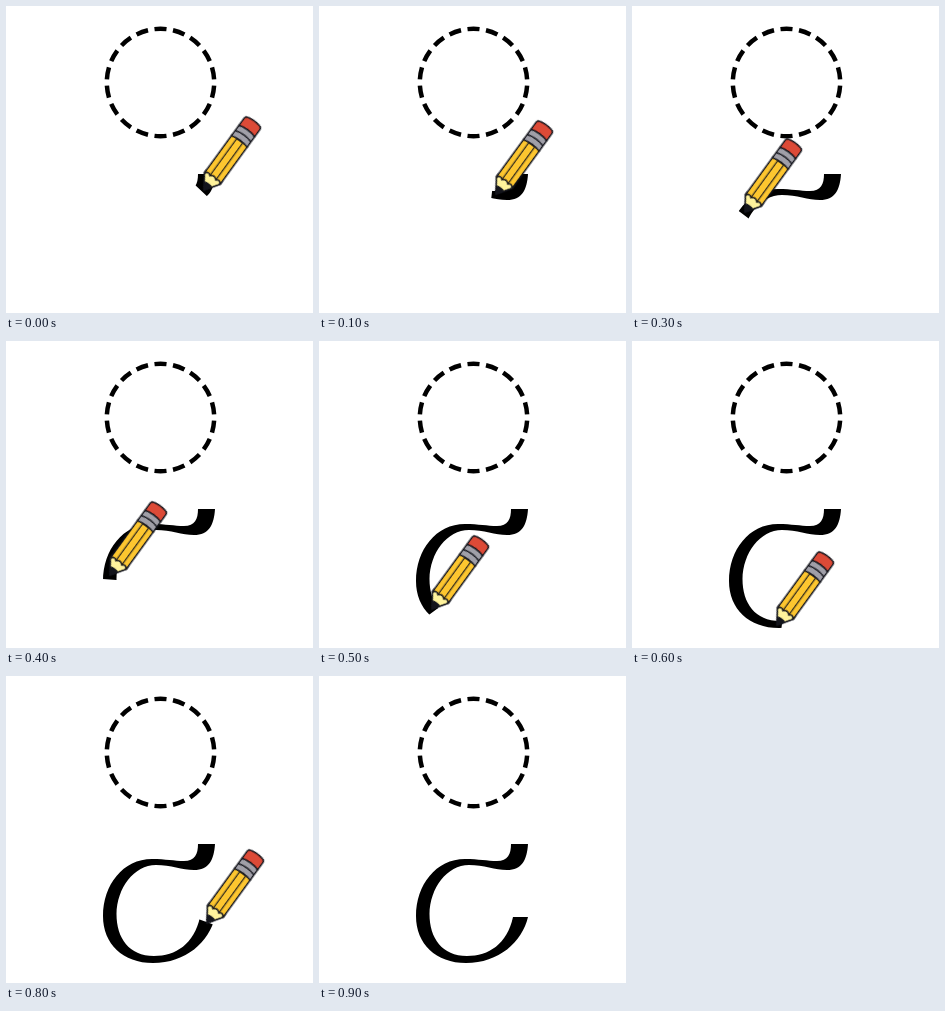
Recreate the animation shown at these times as an HTML page without scripts. Size 307 px wide and 307 px high, loop 2900 ms.

```html
<!DOCTYPE html>
<html lang="en">
<head>
<meta charset="utf-8">
<title>Pencil stroke</title>
<style>
  html, body { margin: 0; width: 100%; height: 100%; overflow: hidden; background: #fff; }
  svg { display: block; width: 100vw; height: 100vh; }

  .reveal {
    fill: none; stroke: #fff; stroke-width: 27; stroke-linejoin: miter;
    stroke-dasharray: 400;
    animation: draw 2.9s step-end infinite;
  }
  .pencil { animation: move 2.9s step-end infinite; }

  /* dash offset = 400 - drawn length */
  @keyframes draw {
    0%      { stroke-dashoffset: 379.5px; }
    3.448%  { stroke-dashoffset: 356px; }
    6.896%  { stroke-dashoffset: 320.5px; }
    10.344% { stroke-dashoffset: 286px; }
    13.793% { stroke-dashoffset: 254px; }
    17.241% { stroke-dashoffset: 219.5px; }
    20.689% { stroke-dashoffset: 181px; }
    24.137% { stroke-dashoffset: 145px; }
    27.586% { stroke-dashoffset: 114px; }
    31.034%, 100% { stroke-dashoffset: 0; }
  }
  @keyframes move {
    0%      { transform: translate(198px, 184px); }
    3.448%  { transform: translate(177px, 188px); }
    6.896%  { transform: translate(141px, 187px); }
    10.344% { transform: translate(113px, 206px); }
    13.793% { transform: translate(104px, 234px); }
    17.241% { transform: translate(113px, 268px); }
    20.689% { transform: translate(145px, 284px); }
    24.137% { transform: translate(178px, 275px); }
    27.586% { transform: translate(201px, 247px); visibility: visible; }
    31.034%, 100% { transform: translate(201px, 247px); visibility: hidden; }
  }
</style>
</head>
<body>
<svg viewBox="0 0 307 307">
  <mask id="drawn" maskUnits="userSpaceOnUse" x="0" y="0" width="307" height="307">
    <path class="reveal" d="M200.5 166V178L192 187 180 189.5 150 186 137 186.5 120 198 105 218 103.5 239 107 259 115.5 270.5 130 281 150 283.5 168 279.5 184 271 196 257 203 238"/>
  </mask>

  <circle cx="154.5" cy="76.5" r="53.7" fill="none" stroke="#000" stroke-width="4.5"
    pathLength="18" stroke-dasharray=".65 .35" stroke-dashoffset="-.175"/>

  <g mask="url(#drawn)">
    <path d="M192 168H209C208 184 203 194 188 194C176 194 165 189 150 189C128 189 111 212 110.5 238C110.5 262 123 280 148 280C170 280 188 268 194 241H209C203 266 180 287 147 287C117 287 97 268 97 240C97 209 117 183 146 183C160 183 168 185 178 185C189 185 192 178 192 168Z"/>
  </g>

  <!-- tip at the origin, pointing down before the tilt -->
  <g class="pencil">
    <g transform="rotate(36)" stroke="#14151c" stroke-width="1.5" stroke-linejoin="round">
      <path fill="#fff39c" d="M0 0L-9.7 -14V-18H9.7V-14Z"/>
      <path fill="#14151c" d="M0 0L-4.4 -6.5Q0 -8.5 4.4 -6.5Z"/>
      <path fill="#fdc62f" d="M-9.7 -14Q-6.5 -18.5 -3.7 -15Q0 -19 3.7 -15Q6.5 -18.5 9.7 -14V-61H-9.7Z"/>
      <path fill="none" stroke-width="1.1" d="M-3.7 -15V-60M3.7 -15V-60"/>
      <path fill="#a09fa8" d="M-9.7 -60Q0 -63 9.7 -60V-73Q0 -76 -9.7 -73Z"/>
      <path fill="none" d="M-9.7 -66.5Q0 -69.5 9.7 -66.5"/>
      <path fill="#dc4a37" d="M-9.7 -73Q0 -76 9.7 -73V-81.5Q9.7 -84 7.5 -84.5Q0 -86.5 -7.5 -84.5Q-9.7 -84 -9.7 -81.5Z"/>
    </g>
  </g>
</svg>
</body>
</html>
```
